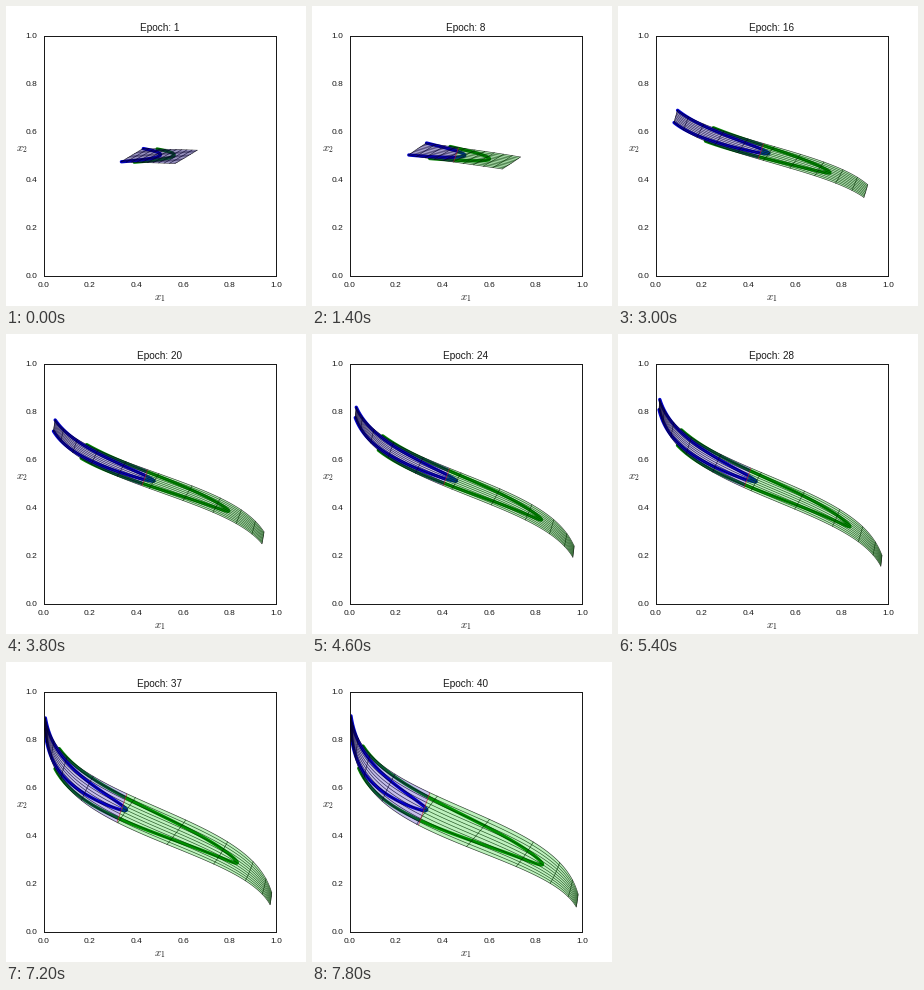
A matplotlib script for the animation above (8 s loop, 300 px wide and 300 px high).

```python
import numpy as np
import matplotlib.pyplot as plt
from matplotlib.animation import FuncAnimation
from matplotlib.patches import Polygon
from matplotlib.path import Path

EPOCHS = 40
INK = "0.1"

plt.rcParams.update({
    "font.family": "Liberation Sans",
    "mathtext.fontset": "cm",
    "text.color": INK,
    "axes.edgecolor": INK,
    "axes.linewidth": 1.2,
})

# Layer weights at a few epochs: x1 = s(a u + b v + c), x2 = s(p u + q v + r)
KEYS = [1, 4, 7, 8, 13, 16, 19, 24, 28, 32, 37, 40]
WEIGHTS = {
    "a": [.475, .57, .76, .86, 1.72, 2.30, 2.78, 3.43, 3.80, 4.09, 4.40, 4.57],
    "b": [.20, .20, .19, .185, .12, .095, .085, .08, .09, .115, .165, .20],
    "c": [-.01, -.015, -.02, -.027, -.04, -.05, -.085, -.16, -.27, -.41, -.59, -.70],
    "p": [-.014, -.04, -.09, -.117, -.40, -.645, -.93, -1.33, -1.56, -1.72, -1.87, -1.94],
    "q": [.11, .108, .103, .10, .107, .115, .12, .135, .152, .172, .21, .235],
    "r": [0, 0, 0, 0, .02, .042, .048, .05, .04, .03, .03, .03],
    "cut": [.74, .60, .485, .46, .455, .45, .435, .41, .39, .37, .335, .32],
}
CUT_TILT = .36
CUT_MID = .51


def smooth(t, vals):
    """Cubic Hermite interpolation through the key values."""
    slopes = np.gradient(vals, KEYS)
    i = min(np.searchsorted(KEYS, t, side="right") - 1, len(KEYS) - 2)
    h = KEYS[i + 1] - KEYS[i]
    s = (t - KEYS[i]) / h
    return ((2 * s**3 - 3 * s**2 + 1) * vals[i] + (3 * s**2 - 2 * s**3) * vals[i + 1]
            + h * (s**3 - 2 * s**2 + s) * slopes[i] + h * (s**3 - s**2) * slopes[i + 1])


def sigmoid(z):
    return 1 / (1 + np.exp(-z))


def warp(w, u, v):
    """Map input points through the hidden layer."""
    return (sigmoid(w["a"] * u + w["b"] * v + w["c"]),
            sigmoid(w["p"] * u + w["q"] * v + w["r"]))


span = np.linspace(-1, 1, 80)
ones = np.ones_like(span)
ticks = np.linspace(-1, 1, 11)
grid = [(span, k * ones) for k in ticks] + [(k * ones, span) for k in ticks]
edge = (np.concatenate([span, ones, -span, -ones]),
        np.concatenate([-ones, span, ones, -span]))
curves = [("#008000", .5 - span**2, span), ("#0000cc", -span**2, span)]

fig, ax = plt.subplots(figsize=(5, 5), dpi=60, facecolor="white")
fig.subplots_adjust(left=.125, right=.9, bottom=.1, top=.9)
ax.set(xlim=(0, 1), ylim=(0, 1))
ax.tick_params(length=0, pad=7, labelsize=10, labelcolor=INK)
title = ax.set_title("", fontsize=12)
fig.text(154 / 300, 1 - 293 / 300, "$x_1$", size=13, ha="center", va="center")
fig.text(16 / 300, 1 - 144 / 300, "$x_2$", size=13, ha="center", va="center")

curve_lines = [ax.plot([], [], color=col, lw=4, solid_capstyle="round", zorder=2)[0]
               for col, _, _ in curves]
grid_lines = [ax.plot([], [], color="black", lw=.8, alpha=.8, zorder=3)[0] for _ in grid]


def half_plane(color):
    patch = Polygon(np.zeros((4, 2)), facecolor=color, edgecolor="none", alpha=.25, zorder=4)
    return ax.add_patch(patch)


left = half_plane("#1800b0")
right = half_plane("#00c800")
cut_line, = ax.plot([], [], color="#c01030", lw=.9, alpha=.75, zorder=5)


def update(i):
    w = {name: smooth(i + 1, vals) for name, vals in WEIGHTS.items()}
    title.set_text(f"Epoch: {i + 1}")
    for line, (_, u, v) in zip(curve_lines, curves):
        line.set_data(*warp(w, u, v))
    for line, (u, v) in zip(grid_lines, grid):
        line.set_data(*warp(w, u, v))

    low = w["cut"] - CUT_TILT * CUT_MID
    high = low + CUT_TILT
    left.set_xy([(-1, 0), (low, 0), (high, 1), (-1, 1)])
    right.set_xy([(2, 0), (low, 0), (high, 1), (2, 1)])
    cut_line.set_data([low, high], [0, 1])
    sheet = Path(np.column_stack(warp(w, *edge)))
    for artist in (left, right, cut_line):
        artist.set_clip_path(sheet, ax.transData)
    return [title, left, right, cut_line, *curve_lines, *grid_lines]


anim = FuncAnimation(fig, update, frames=EPOCHS, interval=200, repeat=True,
                     repeat_delay=0, blit=False)
plt.show()
```
